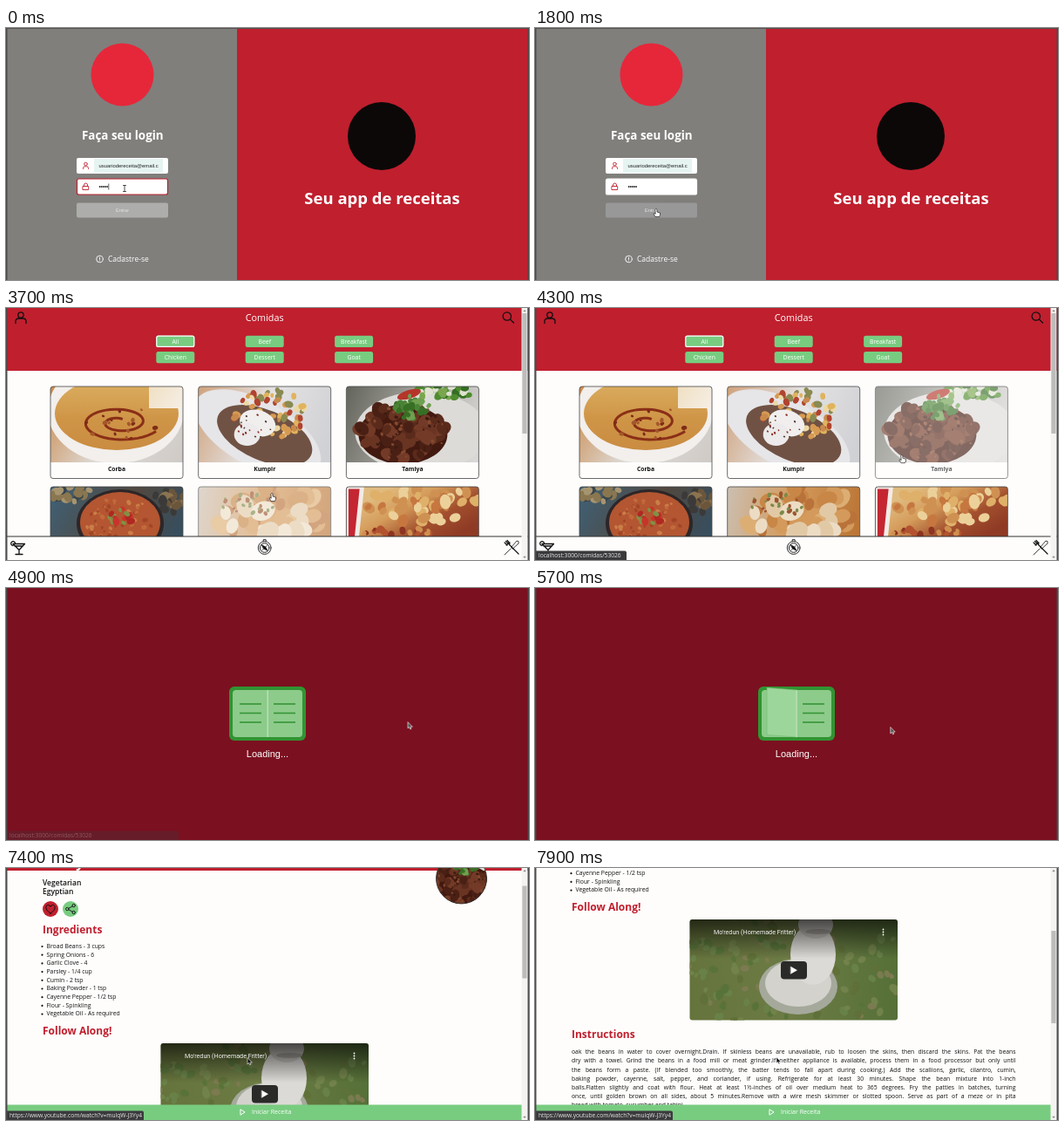
An HTML page with a canvas for the animation above (8 s loop, 600 by 289 pixels).

```html
<!DOCTYPE html>
<html lang="pt-BR">
<head>
<meta charset="utf-8">
<title>Receitas</title>
<style>
  html, body { margin: 0; width: 100%; height: 100%; overflow: hidden; background: #fff; }
  canvas { display: block; width: 600px; height: 289px; }
</style>
</head>
<body>
<canvas id="stage"></canvas>
<script>
const canvas = document.getElementById('stage');
const ctx = canvas.getContext('2d');
const ratio = window.devicePixelRatio || 1;
canvas.width = 600 * ratio;
canvas.height = 289 * ratio;

const LOOP = 8000, HOME = 2150, CARDS = 3300, LOADER = 4650, RECIPE = 5800, VIDEO = 6600;
const RED = '#c01f2e', GREEN = '#78cc80', PAPER = '#fefdfc', INK = '#111';
const SANS = '"Open Sans", "Noto Sans", sans-serif';
const ARIAL = '"Liberation Sans", Arial, sans-serif';

// ---------- helpers ----------
function rect(x, y, w, h, color) {
  ctx.fillStyle = color;
  ctx.fillRect(x, y, w, h);
}
function box(x, y, w, h, r, fill, stroke, width = 1) {
  ctx.beginPath();
  ctx.roundRect(x, y, w, h, r);
  if (fill) { ctx.fillStyle = fill; ctx.fill(); }
  if (stroke) { ctx.strokeStyle = stroke; ctx.lineWidth = width; ctx.stroke(); }
}
function oval(x, y, rx, ry, fill, angle = 0) {
  ctx.beginPath();
  ctx.ellipse(x, y, rx, ry, angle, 0, 7);
  ctx.fillStyle = fill;
  ctx.fill();
}
const disc = (x, y, r, fill) => oval(x, y, r, r, fill);
function icon(x, y, path, color, width = 1, fill) {
  const shape = new Path2D(path);
  ctx.save();
  ctx.translate(x, y);
  ctx.lineCap = ctx.lineJoin = 'round';
  if (fill) { ctx.fillStyle = fill; ctx.fill(shape); }
  ctx.strokeStyle = color;
  ctx.lineWidth = width;
  ctx.stroke(shape);
  ctx.restore();
}
// y is the middle of the capitals
function text(str, x, y, size, color, { weight = 400, align = 'left', family = SANS } = {}) {
  ctx.font = `${weight} ${size}px ${family}`;
  ctx.textAlign = align;
  ctx.fillStyle = color;
  ctx.fillText(str, x, y + size * 0.35);
}
function justified(str, x, y, size, width) {
  ctx.font = `400 ${size}px ${SANS}`;
  const words = str.split(' ');
  const widths = words.map(w => ctx.measureText(w).width);
  const gap = (width - widths.reduce((a, b) => a + b)) / (words.length - 1);
  words.forEach((w, i) => { text(w, x, y, size, INK); x += widths[i] + gap; });
}
function clipped(outline, draw) {
  ctx.save();
  ctx.beginPath();
  outline();
  ctx.clip();
  draw();
  ctx.restore();
}
function gradient(x0, y0, x1, y1, ...colors) {
  const g = ctx.createLinearGradient(x0, y0, x1, y1);
  colors.forEach((c, i) => g.addColorStop(i / (colors.length - 1), c));
  return g;
}
function scatter(seed, count, cx, cy, rx, ry, size, colors) {
  const next = () => (seed = seed * 16807 % 2147483647) / 2147483647;
  for (let i = 0; i < 5; i++) next();
  for (let i = 0; i < count; i++) {
    const a = next() * 6.283, d = Math.sqrt(next()), s = size * (0.6 + next() * 0.7);
    oval(cx + Math.cos(a) * rx * d, cy + Math.sin(a) * ry * d, s, s * 0.75, colors[i % colors.length], next() * 3);
  }
}
// piecewise track of [time, ...values] with eased segments
function track(t, keys) {
  let i = keys.findIndex(k => k[0] > t);
  if (i < 0) return keys[keys.length - 1].slice(1);
  if (i === 0) return keys[0].slice(1);
  const a = keys[i - 1], b = keys[i];
  let p = (t - a[0]) / (b[0] - a[0]);
  p = p * p * (3 - 2 * p);
  return a.slice(1).map((v, k) => v + (b[k + 1] - v) * p);
}

// ---------- icons ----------
const USER = 'M-6 6.5V4.5Q-6 1 -2.5 1H2.5Q6 1 6 4.5V6.5M3.2 -3A3.2 3.2 0 1 1 -3.2 -3A3.2 3.2 0 1 1 3.2 -3';
const SMALL_USER = 'M-3 3.5V2.5Q-3 .8 -1 .8H1Q3 .8 3 2.5V3.5M1.8 -2A1.8 1.8 0 1 1 -1.8 -2A1.8 1.8 0 1 1 1.8 -2';
const LOCK = 'M-3.2 -.5H3.2V3.5H-3.2ZM-2 -.5V-2A2 2 0 0 1 2 -2V-.5';
const SEARCH = 'M3.5 -1.5A4.7 4.7 0 1 1 -5.9 -1.5A4.7 4.7 0 1 1 3.5 -1.5M2.3 2L6.5 6';
const COCKTAIL = 'M-6 -4H7.5L1 3ZM1 3V8M-3 8H5M-4 -1.5H5M-3.5 -4A2.4 2.4 0 1 0 -6 -2';
const COMPASS = 'M7.4 .5A7.4 7.4 0 1 1 -7.4 .5A7.4 7.4 0 1 1 7.4 .5M5.3 .5A5.3 5.3 0 1 1 -5.3 .5A5.3 5.3 0 1 1 5.3 .5M-1.5 -7.2V-8.8H1.5V-7.2';
const NEEDLE = 'M-3.2 -2.7L1 -.5L3.2 3.7L-1 1.5ZM2.8 -2.3L-2.8 3.3';
const FORK = 'M-8 -6L-5 -3M-6.5 -7.5L-3.5 -4.5M-5 -8.5L-2.5 -5.5M-6 -3L-2 -6L-2.5 -3.5L8 7';
const KNIFE = 'M-8 8L-1 1M0 -1L6 -8Q9 -8 8 -5L1.5 1Z';
const HEART = 'M0 5C-8 0 -5 -5 -2.5 -4.6Q-.7 -4.4 0 -2.6Q.7 -4.4 2.5 -4.6C5 -5 8 0 0 5Z';
const SHARE = 'M-2 -.8L2.2 -3.2M-2 .8L2.2 3.2M-2 0A1.7 1.7 0 1 1 -5.4 0A1.7 1.7 0 1 1 -2 0M5.4 -4A1.7 1.7 0 1 1 2 -4A1.7 1.7 0 1 1 5.4 -4M5.4 4A1.7 1.7 0 1 1 2 4A1.7 1.7 0 1 1 5.4 4';
const BACK = 'M3 0H-3M0 -3L-3 0L0 3';
const ARROW = 'M0 0V7L1.6 5.6L2.8 8L4 7.4L2.9 5.2H5Z';
const BEAM = 'M-1.5 -3.5H1.5M0 -3.5V3.5M-1.5 3.5H1.5';
const HAND = 'M-1 0Q0 -1.5 1 0V3L4.5 4V6.5L3.5 8.5H-1L-3 5Q-2.5 4 -1 5Z';

// ---------- food pictures, each 152 x 87 ----------
const foods = {
  corba() {
    rect(0, 0, 152, 87, gradient(0, 0, 152, 87, '#c9894a', '#dedbd8', '#cfcac5'));
    oval(75, 28, 78, 60, '#f2efec');
    oval(76, 31, 71, 42, gradient(0, 0, 0, 75, '#d9aa5c', '#cf9547', '#c98b40'));
    ctx.strokeStyle = '#8a2f17';
    ctx.lineWidth = 3;
    ctx.beginPath();
    for (let a = 0; a < 11; a += 0.15) {
      const r = 48 - a * 3.6;
      ctx.lineTo(79 + r * Math.cos(a + 0.5), 41 + r * 0.45 * Math.sin(a + 0.5));
    }
    ctx.stroke();
    scatter(8, 16, 79, 41, 45, 21, 2.6, ['#7f2a16', '#a4572b']);
    rect(113, 0, 39, 25, gradient(113, 0, 152, 25, '#f0e0c3', '#f6efe6'));
  },
  kumpir() {
    rect(0, 0, 152, 87, gradient(0, 0, 152, 60, '#cfa27c', '#e4e2e2', '#d0d1d5'));
    oval(68, 54, 80, 38, '#e6e5e8', 0.5);
    oval(76, 56, 58, 29, '#705244', 0.4);
    scatter(23, 70, 82, 32, 42, 28, 4, ['#e0b35d', '#d79a52', '#b1432f', '#ecd9a6', '#8a8a52', '#c98a4c']);
    oval(68, 42, 21, 15, '#f1efee', 0.3);
    oval(56, 55, 15, 13, '#eceaea');
    scatter(5, 18, 64, 46, 20, 14, 1.2, ['#8e302a', '#52372d']);
  },
  tamiya() {
    rect(0, 0, 152, 87, gradient(0, 10, 152, 70, '#66675f', '#a9a8a2', '#d9d8d6'));
    oval(86, 52, 76, 46, '#dddbd8');
    scatter(12, 40, 112, 6, 34, 9, 4.5, ['#4e8b2e', '#79a64d', '#dfe2d0', '#356d23']);
    oval(65, 55, 51, 34, '#42190f');
    scatter(41, 65, 65, 53, 48, 32, 8.5, ['#5a2a1b', '#6a3422', '#4a2015', '#733b27']);
    scatter(17, 50, 65, 52, 50, 33, 2, ['#85492f', '#3d1b11']);
    oval(72, 9, 14, 5, '#b5352b', -0.3);
    scatter(31, 32, 76, 24, 20, 14, 4.5, ['#4a8236', '#6fa050', '#376f25']);
  },
  soup() {
    rect(0, 0, 152, 87, gradient(0, 0, 152, 87, '#3e6178', '#51483f', '#2f5068'));
    scatter(9, 24, 24, 8, 24, 10, 5, ['#8a7750', '#37444c', '#a69471']);
    scatter(4, 20, 134, 16, 20, 14, 6, ['#6b563c', '#3b3a38', '#8b7350']);
    oval(80, 42, 50, 39, '#2d2628');
    oval(80, 41, 46, 35, '#b35631');
    scatter(77, 60, 80, 42, 40, 29, 2.5, ['#c26a3c', '#a24526', '#cb7d48']);
    scatter(16, 16, 82, 34, 14, 10, 4, ['#7f9145', '#c9332b', '#b02822']);
  },
  stew() {
    rect(0, 0, 152, 87, gradient(0, 0, 152, 30, '#cbbfb2', '#d49a5c', '#bb7636'));
    scatter(55, 40, 82, 36, 66, 40, 10, ['#c88746', '#d39a5b', '#b9733a', '#dcae74']);
    scatter(6, 13, 88, 36, 60, 26, 11, ['#ecdcc4', '#e2c9a6']);
    scatter(14, 26, 56, 22, 32, 16, 2.5, ['#7c8a48', '#9a5630']);
  },
  lasagna() {
    rect(0, 0, 152, 87, gradient(50, 0, 95, 75, '#e0bb80', '#d49b5a', '#a2502e', '#8f3a25'));
    scatter(64, 45, 92, 22, 70, 22, 7, ['#dfb069', '#cf9152', '#ecd09a', '#c6773f']);
    scatter(13, 24, 60, 56, 50, 9, 4, ['#8d3422', '#b3522f', '#cf8f4f']);
    icon(0, 0, 'M0 0H18L9 87H0Z', '#f2ece7', 5, '#c42632');
  }
};
const menu = [['Corba', foods.corba], ['Kumpir', foods.kumpir], ['Tamiya', foods.tamiya],
  ['', foods.soup], ['', foods.stew], ['', foods.lasagna]];

// ---------- shared parts ----------
function frameEdges() {
  rect(0, 0, 1.5, 289, '#4a4a4a');
  rect(598.5, 0, 1.5, 289, '#4a4a4a');
}
function scrollbar(top, height) {
  rect(591.5, 0, 7, 289, '#f4f3f2');
  rect(592.3, top, 5.2, height, '#bdbcbb');
  icon(595, 3, 'M-1 .6L0 -.6L1 .6Z', '#555', 0.4, '#555');
  icon(595, 286, 'M-1 -.6L0 .6L1 -.6Z', '#555', 0.4, '#555');
}
function status(str, width, alpha = 1) {
  ctx.globalAlpha = alpha;
  box(-2, 278.5, width + 2, 13, 2, '#3a3a3c');
  text(str, 4, 283.5, 6.65, '#e8e8e8');
  ctx.globalAlpha = 1;
}

// ---------- screens ----------
function login(t) {
  rect(0, 0, 265, 289, '#807f7c');
  rect(265, 0, 335, 289, RED);
  rect(0, 0, 600, 1, '#555250');
  disc(133.5, 53.5, 36, '#e6273a');
  text('Faça seu login', 133.8, 123, 13.4, '#fff', { weight: 700, align: 'center' });

  box(81, 149, 105, 18, 2, '#fff');
  rect(101, 150, 79, 16, '#e6f4f1');
  icon(91.5, 158, SMALL_USER, RED, 0.9);
  text('usuariodereceita@email.c', 106.5, 158, 5.9, '#222', { family: ARIAL });

  const focused = t < 1800;
  box(81.5, 173, 104, 18, 2, '#fff', focused ? RED : '#fff', 1.2);
  icon(91.5, 182, LOCK, RED, 0.9);
  for (let i = 0; i < 5; i++) disc(107.7 + i * 2.1, 182, 0.9, '#222');
  if (focused && t % 1100 < 550) rect(117.5, 178.5, 0.7, 7, '#222');

  const pressed = t >= 1800 && t < 1900;
  box(81, 200.5, 105, 17, 2, pressed ? '#989898' : '#adadac');
  text('Entrar', 133.5, 209, 5.5, '#e4e4e4', { family: ARIAL, align: 'center' });
  icon(107.5, 265, 'M3.8 0A3.8 3.8 0 1 1 -3.8 0A3.8 3.8 0 1 1 3.8 0M0 -1.8V.3M0 1.8V1.9', '#fff', 0.9);
  text('Cadastre-se', 117, 265, 8.5, '#fff');

  disc(431, 124, 39, '#0c0808');
  text('Seu app de receitas', 431.5, 196, 18.5, '#fff', { weight: 700, align: 'center' });
}

function home(t, pointer) {
  const loaded = t >= CARDS, middle = loaded ? 296.7 : 300, right = loaded ? 576 : 582;
  rect(0, 0, 600, 289, PAPER);
  if (loaded) cards(pointer);
  else spinner(t);

  rect(0, 0, 600, 72, RED);
  icon(17, 11, USER, INK, 1.3);
  icon(right, 11, SEARCH, INK, 1.3);
  text('Comidas', middle, 11.5, 10.8, '#fff', { align: 'center' });
  ['All', 'Beef', 'Breakfast', 'Chicken', 'Dessert', 'Goat'].forEach((label, i) => {
    const x = middle + (i % 3 - 1) * 102.4, y = i < 3 ? 38.3 : 56.7;
    box(x - 22, y - 6.6, 44, 13.2, 2.5, GREEN);
    if (!i) box(x - 21.5, y - 6.1, 43, 12.2, 2, null, '#fff', 1.2);
    text(label, x, y, 6.9, '#fff', { align: 'center' });
  });

  rect(0, 262, 600, 27, PAPER);
  rect(0, 261.5, 600, 1, '#333');
  icon(14, 274.5, COCKTAIL, INK, 1.3);
  icon(middle, 274.5, COMPASS, INK, 0.9);
  icon(middle, 274.5, NEEDLE, INK, 0.8, INK);
  icon(right + 4, 275, FORK, INK, 1.2);
  icon(right + 4, 275, KNIFE, INK, 0.8);
  if (loaded) scrollbar(6, 138);
}

function spinner(t) {
  const turn = ((t - 2800) * 0.18 - 15) * Math.PI / 180;
  const ring = (from, to, color) => {
    ctx.beginPath();
    ctx.arc(300, 152, 14.6, from, to);
    ctx.lineWidth = 5.4;
    ctx.strokeStyle = color;
    ctx.stroke();
  };
  ring(0, 7, '#f0f0f0');
  ring(turn, turn + Math.PI / 2, RED);
  text('Carregando receitas...', 300, 179, 6.7, INK, { weight: 700, align: 'center' });
}

function cards([px, py]) {
  menu.forEach(([name, picture], i) => {
    const x = 51 + (i % 3) * 169.7, y = i < 3 ? 90 : 205;
    const hovered = px > x && px < x + 152 && py > y && py < y + 105;
    clipped(() => ctx.roundRect(x, y, 152, 87, [3, 3, 0, 0]), () => {
      ctx.translate(x, y);
      picture();
    });
    text(name, x + 76, y + 95, 6.8, INK, { weight: 700, align: 'center' });
    box(x, y, 152, 105.5, 3, hovered && 'rgba(255,255,255,.35)', hovered ? '#777' : '#444', 0.8);
  });
}

function loader(t) {
  rect(0, 0, 600, 289, '#7b1020');
  box(256, 113, 88, 62, 6, '#319432');
  box(260, 117, 80, 54, 4, '#8dcb8b');
  const lines = (x, w) => [133, 143.5, 154].forEach(y => rect(x, y - 0.8, w, 1.6, '#359437'));
  lines(268, 25);
  lines(307, 25);
  const phase = ((t - LOADER) % 1200) / 1200;
  if (phase > 0.3) {
    const reach = 40 * Math.cos((phase - 0.3) / 0.7 * Math.PI);
    const lift = 5 * Math.sin((phase - 0.3) / 0.7 * Math.PI);
    icon(300, 0, `M0 117L${reach} ${117 - lift}V${171 - lift}L0 171Z`, '#79bd78', 0.6, '#9dd69a');
  }
  rect(299.7, 117, 0.9, 54, '#d6edd2');
  text('Loading...', 300, 190, 11, '#fff', { family: ARIAL, align: 'center' });
  status('localhost:3000/comidas/53026', 198, Math.max(0, 0.3 - Math.max(0, t - 4900) / 1000));
}

const ingredients = ['Broad Beans - 3 cups', 'Spring Onions - 6', 'Garlic Clove - 4', 'Parsley - 1/4 cup',
  'Cumin - 2 tsp', 'Baking Powder - 1 tsp', 'Cayenne Pepper - 1/2 tsp', 'Flour - Spinkling', 'Vegetable Oil - As required'];
const steps = [
  'oak the beans in water to cover overnight.Drain. If skinless beans are unavailable, rub to loosen the skins, then discard the skins. Pat the beans',
  'dry with a towel. Grind the beans in a food mill or meat grinder.If neither appliance is available, process them in a food processor but only until',
  'the beans form a paste. (If blended too smoothly, the batter tends to fall apart during cooking.) Add the scallions, garlic, cilantro, cumin,',
  'baking powder, cayenne, salt, pepper, and coriander, if using. Refrigerate for at least 30 minutes. Shape the bean mixture into 1-inch',
  'balls.Flatten slightly and coat with flour. Heat at least 1½-inches of oil over medium heat to 365 degrees. Fry the patties in batches, turning',
  'once, until golden brown on all sides, about 5 minutes.Remove with a wire mesh skimmer or slotted spoon. Serve as part of a meze or in pita'];

function recipe(t) {
  const [scroll] = track(t, [[7200, 0], [7400, 40], [7600, 95], [7700, 95], [7900, 182]]);
  const heading = (str, y) => text(str, 42, y, 12, RED, { weight: 700 });
  rect(0, 0, 600, 289, PAPER);
  ctx.save();
  ctx.translate(0, -scroll);
  rect(0, 0, 600, 43, RED);
  icon(30, 13.5, BACK, '#fff', 1);
  text('Tamiya', 42, 33.5, 16, '#fff', { weight: 700 });
  clipped(() => ctx.arc(522.5, 52, 29, 0, 7), () => {
    ctx.translate(473, 20);
    ctx.scale(0.73, 0.73);
    foods.tamiya();
  });
  icon(522.5, 52, 'M29 0A29 29 0 1 1 -29 0A29 29 0 1 1 29 0', '#333', 0.8);
  text('Vegetarian', 42, 57, 8.5, INK, { weight: 600 });
  text('Egyptian', 42, 67.5, 8.5, INK, { weight: 600 });
  disc(51, 87, 9, RED);
  icon(51, 87, HEART, INK, 1);
  disc(74, 87, 9, GREEN);
  icon(74, 87, SHARE, INK, 0.9);
  heading('Ingredients', 111);
  ingredients.forEach((item, i) => {
    const y = 129.5 + i * 9.7;
    disc(41.5, y + 0.5, 1.1, INK);
    text(item, 46.5, y, 6.83, INK);
  });
  heading('Follow Along!', 227);
  if (t >= VIDEO) video();
  heading('Instructions', 372.5);
  steps.forEach((line, i) => justified(line, 42, 393 + i * 10.1, 6.8, 509.5));
  text('bread with tomato, cucumber and tahini', 42, 453.6, 6.8, INK);
  ctx.restore();

  rect(0, 271.5, 592, 17.5, GREEN);
  icon(271.5, 280, 'M-2.2 -3L2.6 0L-2.2 3Z', '#fff', 1);
  text('Iniciar Receita', 282, 280, 7, '#fff');
  scrollbar(6 + scroll * 0.363, 106);
  if (t < 6800) status('Waiting for www.thecocktaildb.com…', 199);
  else if (t >= 7300) status('https://www.youtube.com/watch?v=mulqW-J3Yy4', 158);
}

function video() {
  clipped(() => ctx.roundRect(177.5, 241, 238.5, 115.5, 3), () => {
    rect(177, 241, 240, 116, gradient(177, 0, 416, 0, '#65733c', '#6d7b45', '#557038'));
    scatter(91, 150, 297, 300, 135, 70, 5, ['#71824a', '#5f7038', '#7c7a50', '#58733a', '#688148']);
    oval(302, 318, 45, 32, '#a5a99c');
    oval(302, 314, 38, 27, '#d3d2cc');
    oval(319, 281, 26, 35, '#dcdad6');
    oval(322, 247, 20, 16, '#c9c5c0');
    oval(325, 255, 15, 3, '#aaa69f');
    rect(177, 241, 240, 45, gradient(0, 241, 0, 286, 'rgba(0,0,0,.65)', 'rgba(0,0,0,0)'));
  });
  text("Mo'redun (Homemade Fritter)", 205, 255.5, 7.2, '#f4f4f4', { family: 'Roboto, sans-serif' });
  for (const y of [252.5, 255.5, 258.5]) disc(399.5, y, 0.9, '#fff');
  box(282, 289, 30, 20.5, 4, '#2a2a29');
  icon(296.5, 299.2, 'M-3 -4L4 0L-3 4Z', '#fff', 0.5, '#fff');
}

// ---------- pointer and timeline ----------
const path = [[600, 136, 184], [1300, 139, 208], [3100, 139, 208], [3700, 305, 213], [3900, 305, 213], [4500, 461, 154],
  [5200, 461, 154], [6100, 370, 164], [6500, 370, 164], [7300, 277, 218], [7900, 277, 217]];

function cursor(t, [x, y]) {
  const overLink = (t > CARDS && t < LOADER && y > 90) || (t < HOME && y > 201);
  if (t < HOME && y < 192) icon(x, y, BEAM, '#222', 0.8);
  else if (overLink) icon(x, y, HAND, '#222', 0.7, '#fff');
  else icon(x, y, ARROW, '#fff', 0.6, t >= LOADER && t < RECIPE ? '#555' : '#111');
}

function draw(t) {
  const pointer = track(t, path);
  ctx.setTransform(ratio, 0, 0, ratio, 0, 0);
  if (t < HOME) login(t);
  else if (t < LOADER) {
    home(t, pointer);
    if (t > 4300) status('localhost:3000/comidas/53026', 105);
  }
  else if (t < RECIPE) loader(t);
  else recipe(t);
  frameEdges();
  cursor(t, pointer);
}

const start = performance.now();
function tick() {
  draw((performance.now() - start) % LOOP);
  requestAnimationFrame(tick);
}
tick();
</script>
</body>
</html>
```
